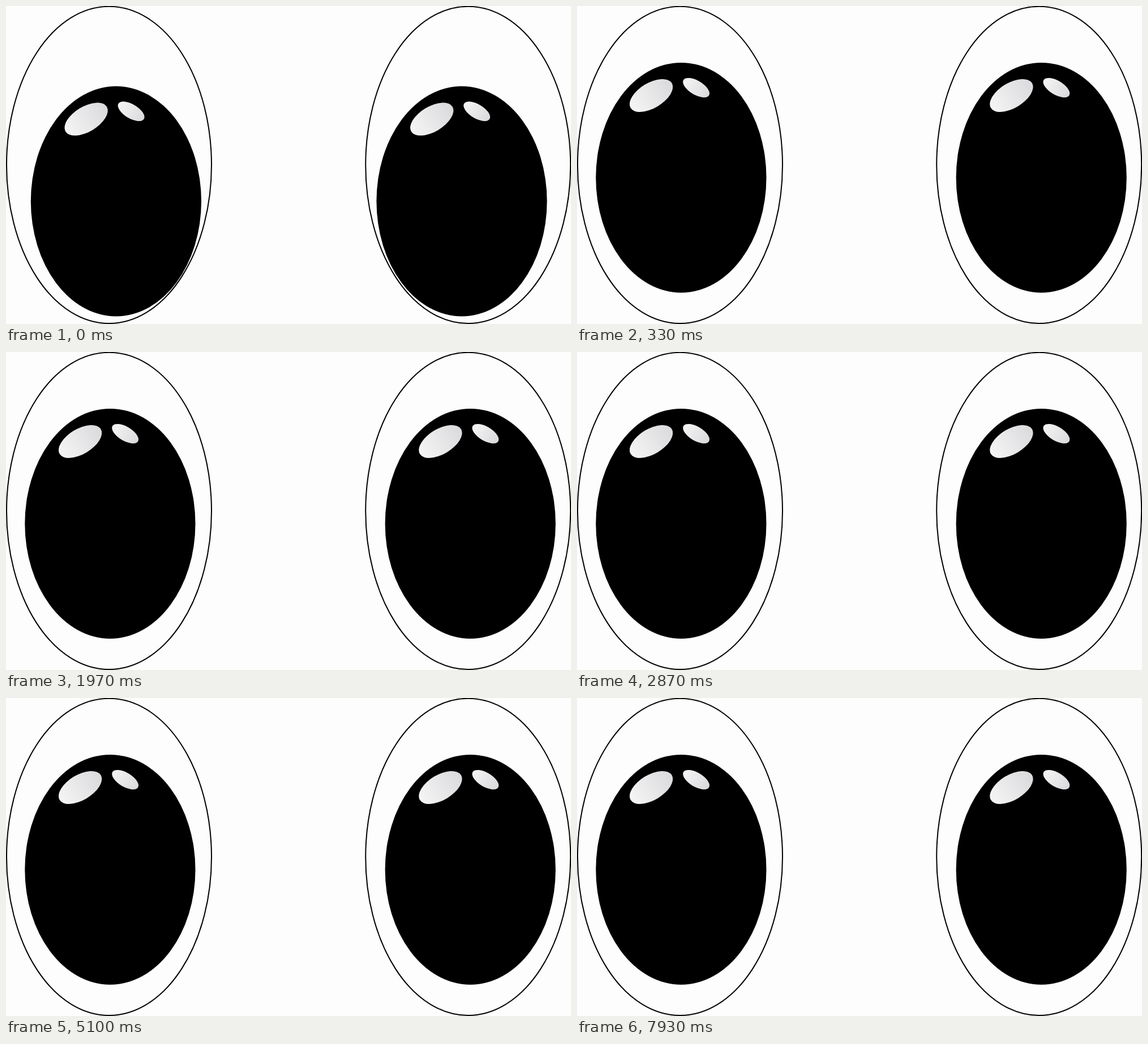
Recreate the animation shown at these times as an HTML page. Size 998 px wide and 561 px high, loop 8000 ms.

```html
<!DOCTYPE html>
<html lang="en">
<head>
<meta charset="utf-8">
<title>Blinking eyes</title>
<style>
  html, body { margin: 0; width: 100%; height: 100%; overflow: hidden; background: #fdfdfd; }
  svg { display: block; width: 100vw; height: 100vh; }
  .white { fill: #fdfdfd; stroke: #000; stroke-width: 2; vector-effect: non-scaling-stroke; }
  .closed .white { fill: #000; }
  .closed .glint { display: none; }
</style>
</head>
<body>
<svg viewBox="0 0 998 561">
  <defs>
    <linearGradient id="shine">
      <stop offset="0" stop-color="#f5f5f5"/>
      <stop offset="1" stop-color="#dadadd"/>
    </linearGradient>
    <g id="pupil">
      <ellipse rx="150.6" ry="202.9"/>
      <g class="glint" fill="url(#shine)">
        <ellipse rx="42.5" ry="22.2" transform="translate(-52.8 -144.9) rotate(-31)"/>
        <ellipse rx="26.3" ry="12.4" transform="translate(26.7 -158.7) rotate(31)"/>
      </g>
    </g>
  </defs>
  <g id="eyes">
    <ellipse class="white" cx="182" cy="280.4" rx="181" ry="279.6"/>
    <ellipse class="white" cx="816.2" cy="280.4" rx="181" ry="279.6"/>
    <use id="left" href="#pupil"/>
    <use id="right" href="#pupil"/>
  </g>
</svg>
<script>
  const LOOP = 8000, TICK = 100 / 3;
  const BLINK = 234, BLINK_TICKS = 4;   // in ticks
  const CLOSED = 0.0107, LID_Y = 542.8;

  // tick, left x, right x, y
  const gaze = [
    [0, 194.4, 805, 344.5],
    [3, 181.3, 817.6, 318.3],
    [6, 183.9, 820.2, 302.8]
  ];

  const el = id => document.getElementById(id);
  const eyes = el('eyes'), left = el('left'), right = el('right');
  const lerp = (a, b, k) => a + (b - a) * k;

  function gazeAt(tick) {
    const i = tick < gaze[1][0] ? 0 : 1;
    const [a, b] = [gaze[i], gaze[i + 1]];
    let k = Math.min(1, (tick - a[0]) / (b[0] - a[0]));
    if (i) k = k * (2 - k);
    return a.map((v, n) => lerp(v, b[n], k));
  }

  function draw(ms) {
    const tick = Math.floor((ms + 4) / TICK);
    const [, lx, rx, y] = gazeAt(tick);
    left.setAttribute('transform', `translate(${lx} ${y})`);
    right.setAttribute('transform', `translate(${rx} ${y})`);

    const open = tick < BLINK ? 1 : Math.min(1, (tick - BLINK) / BLINK_TICKS);
    const s = lerp(CLOSED, 1, open);
    eyes.setAttribute('transform', `translate(0 ${LID_Y * (1 - s)}) scale(1 ${s})`);
    eyes.setAttribute('class', open ? '' : 'closed');
  }

  const start = performance.now();
  function loop() {
    draw((performance.now() - start) % LOOP);
    requestAnimationFrame(loop);
  }
  loop();
</script>
</body>
</html>
```
